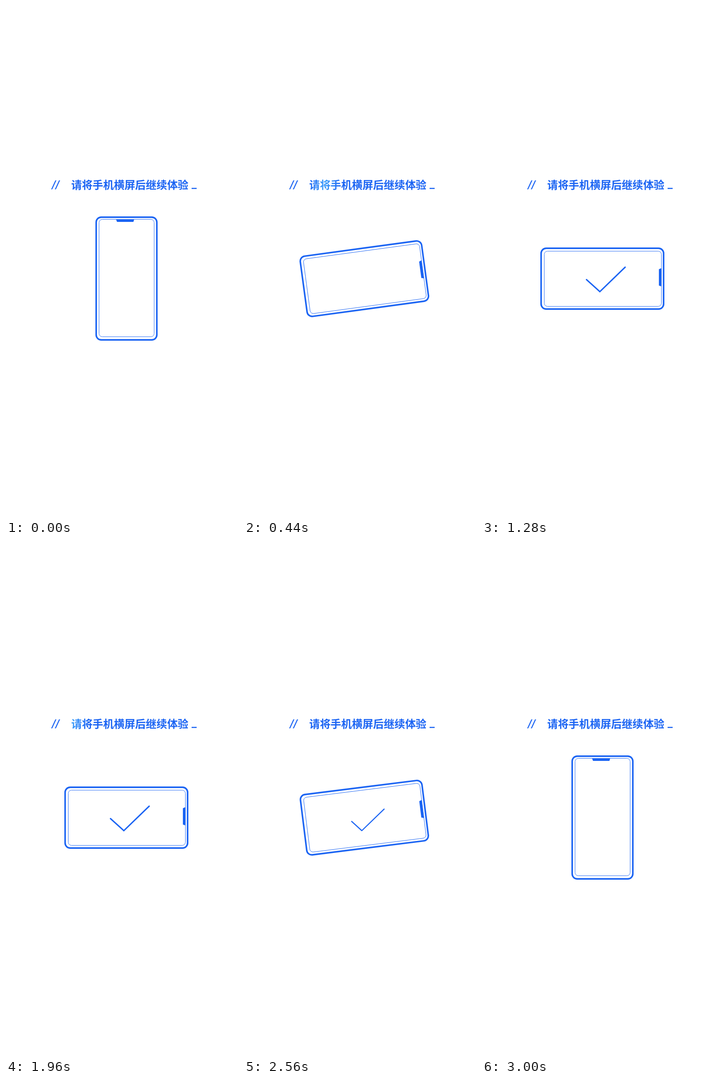
An HTML page for the animation above (3.6 s loop, 505 by 1110 pixels).

```html
<!DOCTYPE html>
<html lang="zh">
<head>
<meta charset="utf-8">
<style>
  html, body { margin: 0; width: 100%; height: 100%; overflow: hidden; background: #fff; }
  svg { display: block; }
  .title { font: bold 23.2px "Noto Sans CJK SC", "Noto Sans CJK", sans-serif; }
  .slashes { font: italic 26px "Liberation Sans", Arial, sans-serif; letter-spacing: .9px; }
</style>
</head>
<body>
<svg width="505" height="1110" viewBox="0 0 505 1110" fill="none">
  <defs>
    <linearGradient id="shine" gradientUnits="userSpaceOnUse" x1="-34" y1="-8" x2="34" y2="8">
      <stop offset="0" stop-color="#1b64f3"/>
      <stop offset=".5" stop-color="#3f9ffa"/>
      <stop offset="1" stop-color="#1b64f3"/>
    </linearGradient>
  </defs>
  <g fill="#1b64f3">
    <text class="slashes" x="100" y="398" stroke="#1b64f3" stroke-width=".4">//</text>
    <text class="title" x="142" y="397.3" fill="url(#shine)">请将手机横屏后继续体验</text>
    <rect x="404" y="395" width="11" height="2.4"/>
  </g>
  <g id="phone" stroke="#1b64f3">
    <rect x="-65.7" y="-133.3" width="132" height="266.6" rx="11" stroke-width="3.4"/>
    <rect x="-59.5" y="-128.5" width="120" height="255" rx="7" stroke-width=".9"/>
    <path d="M-22.5-128.5H17L15.3-123H-20.3Z" fill="#1b64f3" stroke="none"/>
  </g>
  <path id="check" d="M227.5 594.3 256.5 620.5 311.6 567.3" pathLength="1"
    stroke="#1b64f3" stroke-linecap="round"/>
</svg>
<script>
const LOOP = 3600, STEP = 40;
const get = id => document.getElementById(id);
const phone = get('phone'), check = get('check'), shine = get('shine');

const progress = (t, start, length) => Math.min(1, Math.max(0, (t - start) / length));
const easeInOut = p => p < .5 ? (2 * p) ** 2.93 / 2 : 1 - (2 - 2 * p) ** 2.93 / 2;
const easeOut = p => 1 - (1 - p) ** 2.15;

// The highlight crosses the title once per turn of the phone.
function shineX(t) {
  const start = t < 1900 ? 400 : 1960;
  return t < start || t > start + 400 ? -200 : 143 + (t - start) * .82;
}

function draw(now) {
  const t = Math.floor(now % LOOP / STEP) * STEP;
  const back = easeInOut(progress(t, 2400, 600));
  const turn = easeInOut(progress(t, 0, 606)) - back;
  phone.setAttribute('transform', `translate(262 592) rotate(${90 * turn})`);
  shine.setAttribute('gradientTransform', `translate(${shineX(t)} 388)`);

  // The tick grows from its left end, then shrinks from both ends.
  const drawn = easeOut(progress(t, 580, 720));
  const length = drawn - 2 * back;
  check.style.display = length > 0 ? '' : 'none';
  check.setAttribute('stroke-dasharray', `${Math.max(0, length)} 2`);
  check.setAttribute('stroke-dashoffset', -back);
  check.setAttribute('stroke-width', Math.max(1, 3 - 8 * back));
}

let origin;
function tick(now) {
  origin ??= now;
  draw(now - origin);
  requestAnimationFrame(tick);
}
draw(0);
requestAnimationFrame(tick);
</script>
</body>
</html>
```
